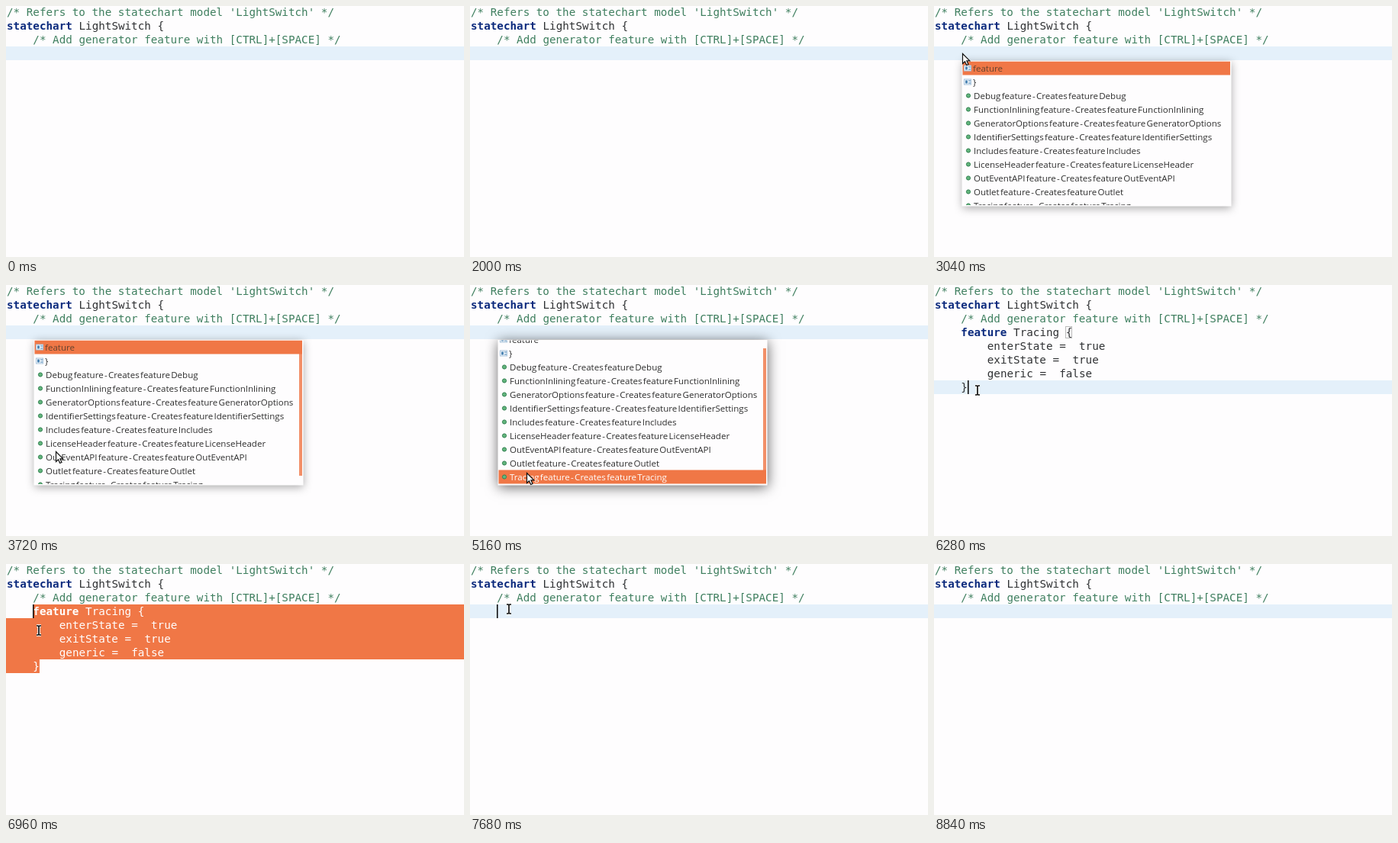
Animation of 600x329 px, one loop 9360 ms. Source, as an HTML page with a canvas:

```html
<!DOCTYPE html>
<html lang="en">
<head>
<meta charset="utf-8">
<title>Generator feature completion</title>
<style>
html, body { margin: 0; width: 100%; height: 100%; overflow: hidden; background: #fefdfe; }
canvas { display: block; }
</style>
</head>
<body>
<canvas id="stage" width="600" height="329"></canvas>
<script>
const g = document.getElementById('stage').getContext('2d');
const LOOP = 9360, STEP = 40;
const CHAR = 8.59, LINE = 18;
const CODE_FONT = `${CHAR / 0.602}px "DejaVu Sans Mono", monospace`;
const LIST_FONT = '11.55px "Open Sans", sans-serif';
const BG = '#fefdfe', ORANGE = '#f07746', GREEN = '#3f7f5f', NAVY = '#0b2a7d', INK = '#303234';

// Moments of the story
const OPEN = 2560, HOVER = 3040, PICK = 5160, INSERT = 5320, CLICK = 6280,
  DRAG = 6680, DELETE = 7600, LEAVE = 8640;

const colX = col => 1 + col * CHAR;
const lineY = line => line * LINE - 1;
const within = (t, ...spans) => spans.some(([a, b]) => t >= a && t < b);
const ramp = (t, a, b) => Math.min(1, Math.max(0, (t - a) / (b - a)));
const ease = k => k * k * (3 - 2 * k);

const HEADER = [
  "/* Refers to the statechart model 'LightSwitch' */",
  'statechart LightSwitch {',
  '    /* Add generator feature with [CTRL]+[SPACE] */'
];
const BLOCK = [
  '    feature Tracing {',
  '        enterState =  true',
  '        exitState =  true',
  '        generic =  false',
  '    }'
];
const FEATURES = ['Debug', 'FunctionInlining', 'GeneratorOptions', 'IdentifierSettings',
  'Includes', 'LicenseHeader', 'OutEventAPI', 'Outlet', 'Tracing'];
const ITEMS = ['feature', '}', ...FEATURES.map(f => `${f} feature - Creates feature ${f}`)];

// Pointer glides: start, end, from, to, optional bend
const EDGE = [368, 11], HOME = [37, 62], LIST = [70, 246], ITEM = [74, 246],
  END = [57, 138], TOP = [36, 60], REST = [51, 59], EXIT = [34, 15];
const GLIDES = [
  [280, 1200, EDGE, HOME, [-85, 62]],
  [HOVER, 3940, HOME, LIST],
  [4200, 4680, LIST, ITEM],
  [5400, 6120, ITEM, END],
  [6720, 7120, END, TOP],
  [7360, 7400, TOP, REST],
  [8120, LEAVE, REST, EXIT]
];

function rect(x, y, w, h, color) {
  g.fillStyle = color;
  g.fillRect(x, y, w, h);
}

function drawCode(lines, first, color) {
  lines.forEach((line, i) => {
    for (const { 0: text, index } of line.matchAll(/\/\*.*|statechart|feature|\S+/g)) {
      const keyword = /^(statechart|feature)$/.test(text);
      g.font = (keyword ? 'bold ' : '') + CODE_FONT;
      g.fillStyle = color || (keyword ? NAVY : text.startsWith('/*') ? GREEN : INK);
      g.fillText(text, colX(index), (first + i) * LINE + 13);
    }
  });
}

function drawCaret(line, col) {
  rect(Math.round(colX(col)), lineY(line), 1.6, LINE, '#111');
}

function drawSelection(line, col) {
  const area = new Path2D();
  for (let i = line; i <= 7; i++) {
    const x = i === line ? colX(col) : 0;
    area.rect(x, lineY(i), (i === 7 ? colX(5) : 600) - x, LINE);
  }
  g.save();
  g.clip(area);
  rect(0, 0, 600, 329, ORANGE);
  drawCode(BLOCK, 3, '#fff');
  g.restore();
}

function drawIcon(isFeature, y) {
  if (!isFeature) {
    rect(39, y - 4, 10, 8, '#a9c4dc');
    rect(40, y - 3, 8, 6, '#f1f7fb');
    rect(41, y - 2, 3, 4, '#4f86b5');
    rect(45, y - 2, 3, 1, '#4f86b5');
    rect(45, y + 1, 3, 1, '#4f86b5');
    return;
  }
  g.beginPath();
  g.arc(45, y, 2.6, 0, 7);
  g.fillStyle = '#62b57c';
  g.fill();
  g.strokeStyle = '#348153';
  g.lineWidth = 1;
  g.stroke();
}

function drawPopup(t) {
  const picked = t >= PICK;
  const selected = picked ? ITEMS.length - 1 : 0;
  const scroll = picked ? 10 : 0;
  g.save();
  g.globalAlpha = ramp(t, OPEN - 40, OPEN + 160) - ramp(t, INSERT - 40, INSERT + 160);
  g.shadowColor = `rgba(0,0,0,${picked ? 0.6 : 0.34})`;
  g.shadowBlur = picked ? 16 : 11;
  g.shadowOffsetY = 2;
  rect(36.5, 72, 353, 190.5, BG);
  g.shadowColor = 'transparent';
  g.beginPath();
  g.rect(37, 72.5, 352, 188.5);
  g.clip();
  g.font = LIST_FONT;
  g.wordSpacing = '-1.7px';
  if (t >= 3200) rect(384, 73 + scroll, 4, 177, '#f28f68');
  ITEMS.forEach((text, i) => {
    const top = 72.5 + i * LINE - scroll;
    const isFeature = i > 1;
    if (i === selected) rect(37.5, top, 350.5, LINE, ORANGE);
    drawIcon(isFeature, top + 9);
    g.fillStyle = i !== selected ? '#2e2e2e' : picked ? '#fff' : '#65432f';
    g.fillText(text, isFeature ? 52 : 51, top + 13);
  });
  g.restore();
}

function pointerAt(t) {
  const [start, end, from, to, bend] = GLIDES.findLast(glide => t >= glide[0]);
  const k = ease(ramp(t, start, end));
  return from.map((a, i) => {
    const b = to[i], c = bend ? bend[i] : (a + b) / 2;
    return Math.round((1 - k) ** 2 * a + 2 * k * (1 - k) * c + k * k * b);
  });
}

function drawPointer(t) {
  g.save();
  g.translate(...pointerAt(t));
  if (within(t, [HOVER, 5400])) {
    const arrow = new Path2D('M.5 .5V13.5L3.5 10.7L5.7 15.5L8 14.5L5.9 9.8H9.8Z');
    g.fillStyle = '#fff';
    g.fill(arrow);
    g.strokeStyle = '#111';
    g.lineWidth = 1.2;
    g.stroke(arrow);
  } else {
    const beam = new Path2D('M-3 -6H-1L0 -5L1 -6H3M0 -5V5M-3 6H-1L0 5L1 6H3');
    for (const [color, width] of [['#fff', 3.6], ['#111', 1.7]]) {
      g.strokeStyle = color;
      g.lineWidth = width;
      g.stroke(beam);
    }
  }
  g.restore();
}

function draw(t) {
  const inserted = within(t, [INSERT, DELETE]);
  const atEnd = within(t, [CLICK, DRAG]);
  const dragging = within(t, [DRAG, DELETE]);

  rect(0, 0, 600, 329, BG);
  if (!dragging) rect(0, lineY(atEnd ? 7 : inserted ? 8 : 3), 600, LINE, '#e4f0fa');
  drawCode(HEADER, 0);
  if (inserted) drawCode(BLOCK, 3);

  if (dragging) {
    const line = 6 - Math.floor(3 * ramp(t, DRAG, 6920));
    drawSelection(line, 4);
    if (t < 7400) drawCaret(line, 4);
  } else if (atEnd) {
    g.strokeStyle = '#b9b9b9';
    g.lineWidth = 1;
    g.strokeRect(Math.floor(colX(20)) + 0.5, lineY(3) + 1.5, 8, 15);
    drawCaret(7, 5);
  } else if (inserted) {
    if (t < 6120) drawCaret(8, 0);
  } else if (within(t, [1200, 2000], [OPEN, HOVER], [4200, 4960], [DELETE, 8840])) {
    drawCaret(3, 4);
  }
  if (within(t, [OPEN, INSERT + 160])) drawPopup(t);
  if (within(t, [280, 2000], [HOVER, LEAVE])) drawPointer(t);
}

const start = performance.now();
function tick() {
  const t = Math.max(0, performance.now() - start) % LOOP;
  draw(Math.floor(t / STEP) * STEP);
  requestAnimationFrame(tick);
}
tick();
</script>
</body>
</html>
```
